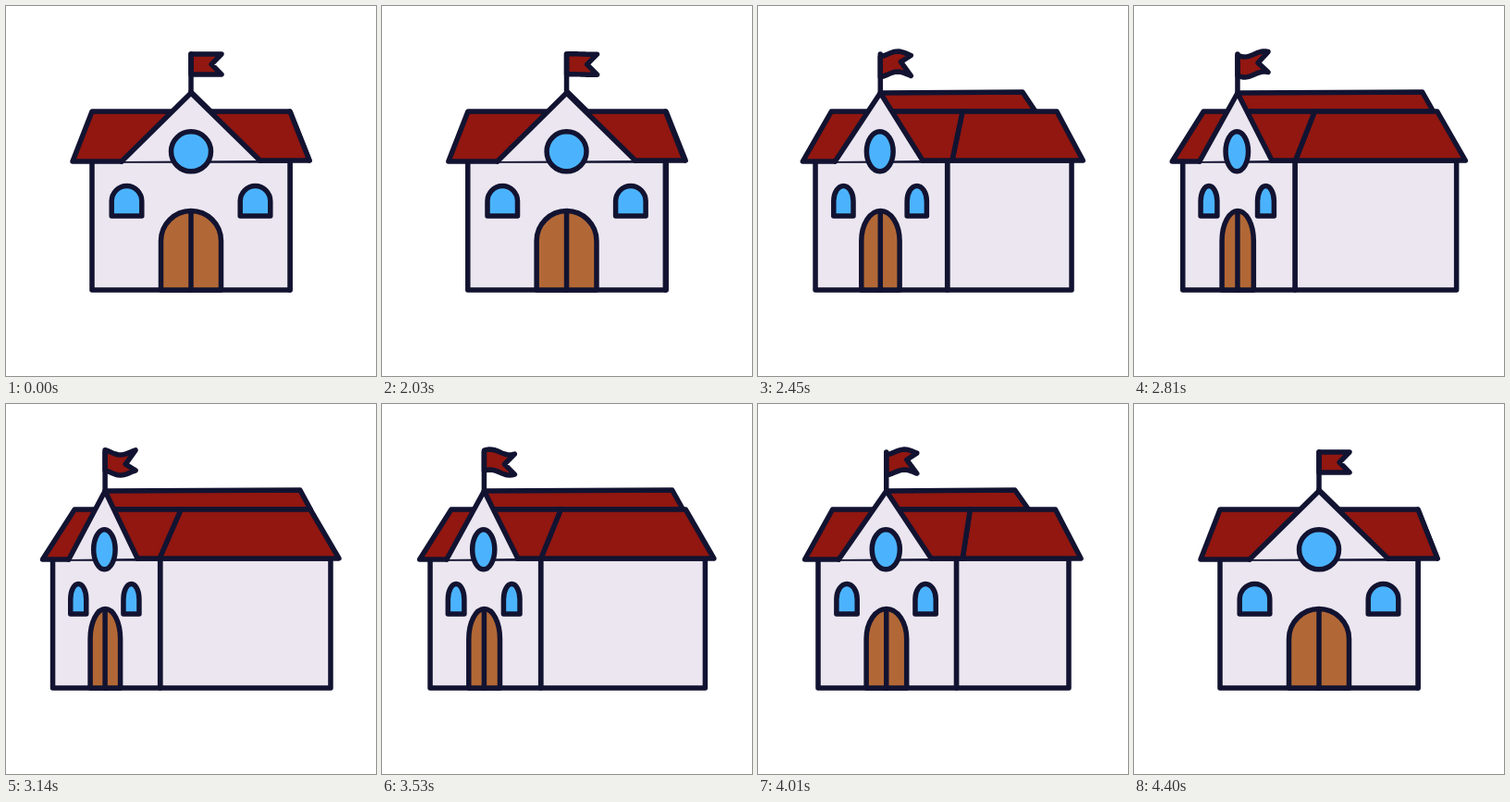
An HTML page with a canvas for the animation above (4490 ms loop, 400x400 px).

```html
<!DOCTYPE html>
<html lang="en">
<head>
<meta charset="utf-8">
<title>Turning schoolhouse</title>
<style>
  html, body { margin: 0; width: 100%; height: 100%; overflow: hidden; background: #fff; }
  canvas { display: block; width: 400px; height: 400px; }
</style>
</head>
<body>
<canvas id="stage" width="400" height="400"></canvas>
<script>
const ctx = document.getElementById('stage').getContext('2d');
const INK = '#121331', RED = '#911710', WALL = '#ebe6ef', SKY = '#4bb3fd', WOOD = '#b26836';
const LOOP = 4490, START = 2000, HALF = 1200, STEP = 30;

// Cubic Bezier easing (0.22, 0, 0.09, 1), solved by bisection
function ease(x) {
  let lo = 0, hi = 1;
  for (let i = 0; i < 24; i++) {
    const s = (lo + hi) / 2, r = 1 - s;
    if (3 * s * r * r * 0.22 + 3 * s * s * r * 0.09 + s ** 3 < x) lo = s; else hi = s;
  }
  return lo * lo * (3 - 2 * lo);
}

function paint(fill) {
  if (fill) {
    ctx.fillStyle = fill;
    ctx.fill();
  }
  ctx.stroke();
}

function shape(points, fill, closed = true) {
  ctx.beginPath();
  points.forEach(([x, y]) => ctx.lineTo(x, y));
  if (closed) ctx.closePath();
  paint(fill);
}

function arch(left, right, top, spring, bottom, fill) {
  ctx.beginPath();
  ctx.moveTo(left, bottom);
  ctx.ellipse((left + right) / 2, spring, (right - left) / 2, spring - top, 0, Math.PI, 2 * Math.PI);
  ctx.lineTo(right, bottom);
  ctx.closePath();
  paint(fill);
}

function drawFlag(x, time, amp) {
  const crest = 0.57 + 0.00085 * (time - 2450);
  const point = (u, y) => [x + 33 * u, y - amp * Math.cos(2 * Math.PI * (u - crest) / 1.3)];
  const top = [], bottom = [];
  for (let i = 0; i <= 12; i++) {
    top.push(point(i / 12, 52));
    bottom.unshift(point(i / 12, 74));
  }
  shape([...top, point(0.67, 63), ...bottom], RED);
  shape([[x, 52], [x, 94]], null, false);
}

function draw(time) {
  const fromEdge = Math.max(0, HALF - Math.abs(time - START - HALF));
  const turn = ease(fromEdge / HALF);
  const at = (x, shift) => x + shift * turn;

  ctx.fillStyle = '#fff';
  ctx.fillRect(0, 0, 400, 400);
  ctx.strokeStyle = INK;
  ctx.lineWidth = 5.5;
  ctx.lineJoin = ctx.lineCap = 'round';

  const apex = at(200, -93);
  const wallLeft = at(93, -42.5), wallMid = at(307, -140.5), wallRight = at(307, 44);
  const gableLeft = at(125, -57.2), gableRight = at(274.5, -132.5);
  const ridge = at(307, -118), eave = at(328, -162.2);

  drawFlag(apex, time, 3 * Math.min(1, fromEdge / 400));

  // Walls
  shape([[wallMid, 167], [wallRight, 167], [wallRight, 307], [wallMid, 307]], WALL);
  shape([[wallLeft, 167], [wallMid, 167], [wallMid, 307], [wallLeft, 307]], WALL);

  // Roofs, back to front
  const backTop = at(200, 118), backFoot = at(274.5, 83);
  shape([[apex, 94], [backTop, 93], [backTop + (backFoot - backTop) * 21 / 73, 114], [apex, 114]], RED);
  shape([[ridge, 114], [at(307, 22), 114], [at(328, 32), 167], [eave, 167]], RED);
  shape([[at(72, -32.5), 168], [at(93, -18.8), 114], [ridge, 114], [eave, 167],
    [gableRight, 167], [apex, 114], [gableLeft, 168]], RED);

  // Gable
  shape([[gableLeft, 168], [apex, 94], [gableRight, 167]], WALL, false);

  // Windows
  ctx.beginPath();
  ctx.ellipse(at(200, -93.7), 157.3, at(21.5, -9.8), 21.5, 0, 0, 2 * Math.PI);
  paint(SKY);
  const half = at(16.3, -7.8);
  for (const x of [at(130.5, -52.3), at(269.5, -134.2)]) {
    arch(x - half, x + half, 194.5, 211, 227, SKY);
  }

  // Door
  arch(at(167.5, -76.5), at(232.5, -109), 221.5, 254, 307, WOOD);
  shape([[apex, 222], [apex, 307]], null, false);
}

function frame() {
  const time = performance.now() % LOOP;
  draw(START + Math.floor((time - START) / STEP) * STEP);
  requestAnimationFrame(frame);
}
frame();
</script>
</body>
</html>
```
